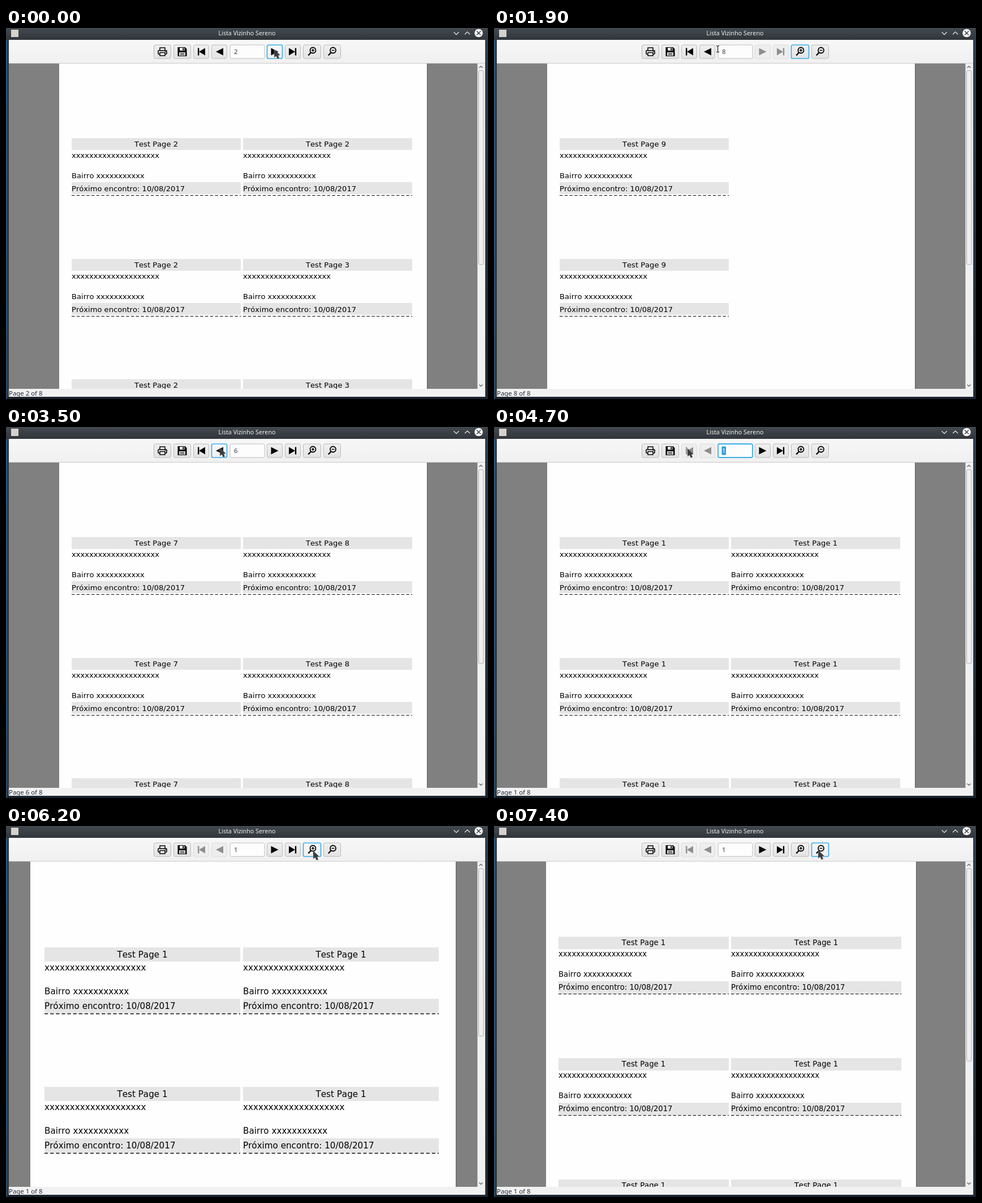
These frames come from a looping animation (852 by 657 pixels, 8000 ms). An HTML page with a canvas:

```html
<!DOCTYPE html>
<html lang="pt">
<head>
<meta charset="utf-8">
<title>Lista Vizinho Sereno</title>
<style>
  html, body { margin: 0; width: 100%; height: 100%; overflow: hidden; background: #1d2b3a; }
  canvas { display: block; }
</style>
</head>
<body>
<canvas id="stage" width="852" height="657"></canvas>
<script>
const ctx = document.getElementById('stage').getContext('2d');
const LOOP = 8000, LAST_LABEL = 57, CENTER = 419, VIEW_TOP = 63;
const BLUE = '#3daee9', UI_FONT = '"Noto Sans", sans-serif';

// Each track holds [start time, value] pairs; values change abruptly.
const pageTrack = [[0, 2], [200, 3], [1000, 8], [2600, 7], [3500, 6], [4700, 1]];
const focusTrack = [[0, 'next'], [900, 'last'], [1000, 'zoomIn'], [2400, 'prev'],
  [4500, 'first'], [4700, 'entry'], [6100, 'zoomIn'], [7400, 'zoomOut']];
const scaleTrack = [[0, 650 / 595], [6200, 752 / 595], [7400, 1.1]];
const pressTrack = [[0, ''], [100, 'next'], [200, ''], [900, 'last'], [1000, ''],
  [2400, 'prev'], [2600, ''], [3400, 'prev'], [3500, '']];
const valueAt = (track, t) => track.filter(([start]) => start <= t).pop()[1];

const moves = [
  { start: 500, end: 700, to: [508, 42] },
  { start: 1500, end: 2100, to: [378, 37] },
  { start: 4100, end: 4400, to: [342, 38] },
  { start: 5500, end: 5900, to: [543, 44], dip: 8 },
  { start: 6800, end: 7100, to: [573, 43] },
];

function cursorAt(t) {
  const tick = Math.floor(t / 100) * 100;
  let [x, y] = [474, 38];
  for (const { start, end, to, dip = 0 } of moves) {
    if (tick < start) break;
    const k = Math.min(1, (tick - start + 100) / (end - start + 100));
    const ease = 1 - (1 - k) ** 1.6;
    x += (to[0] - x) * ease;
    y += (to[1] - y) * ease + dip * Math.sin(Math.PI * k);
  }
  return [x, y];
}

function rect(x, y, w, h, fill) {
  ctx.fillStyle = fill;
  ctx.fillRect(x, y, w, h);
}

function box(x, y, w, h, fill, stroke, width = 1, radius = 2.5) {
  ctx.beginPath();
  ctx.roundRect(x, y, w, h, radius);
  ctx.fillStyle = fill;
  ctx.fill();
  ctx.strokeStyle = stroke;
  ctx.lineWidth = width;
  ctx.stroke();
}

function poly(points, fill) {
  ctx.beginPath();
  points.forEach(([x, y]) => ctx.lineTo(x, y));
  ctx.closePath();
  ctx.fillStyle = fill;
  ctx.fill();
}

function line(points, stroke, width = 1) {
  ctx.beginPath();
  points.forEach(([x, y]) => ctx.lineTo(x, y));
  ctx.strokeStyle = stroke;
  ctx.lineWidth = width;
  ctx.stroke();
}

function text(str, x, y, font, fill, align = 'left') {
  ctx.font = font;
  ctx.fontKerning = 'none';
  ctx.textAlign = align;
  ctx.fillStyle = fill;
  ctx.fillText(str, x, y);
}

function gradient(y0, y1, from, to) {
  const g = ctx.createLinearGradient(0, y0, 0, y1);
  g.addColorStop(0, from);
  g.addColorStop(1, to);
  return g;
}

function chevron(x, y, size, dir, color) {
  line([[x - size, y - dir * size / 2], [x, y + dir * size / 2], [x + size, y - dir * size / 2]], color, 1.1);
}

// Icons are drawn around the origin, the centre of the button.
const triangle = (x, length, color) => poly([[x, -6.5], [x + length, 0], [x, 6.5]], color);

function magnifier(plus) {
  ctx.beginPath();
  ctx.arc(1.5, -2.5, 5, 0, 7);
  ctx.strokeStyle = '#000';
  ctx.lineWidth = 1.8;
  ctx.stroke();
  line([[-2, 1.5], [-6.7, 6.5]], '#000', 2.3);
  line([[-1, -2.5], [4, -2.5]], '#000', 1.5);
  if (plus) line([[1.5, -5], [1.5, 0]], '#000', 1.5);
}

const icons = {
  print() {
    box(-7.5, -2.5, 15, 7, '#eee', '#000', 1.6, 2);
    box(-4.5, -7, 9, 5, '#eee', '#000', 1.5, 0);
    box(-4.5, 1.5, 9, 5.5, '#eee', '#000', 1.5, 0);
    rect(4.5, -1, 1.5, 1.5, '#000');
  },
  save() {
    poly([[-8, -8], [5, -8], [8, -5], [8, 8], [-8, 8]], '#000');
    rect(-4.5, -7, 8.5, 5, '#eee');
    rect(0.8, -6.5, 2, 4, '#000');
    rect(-5.5, 1, 11, 6, '#eee');
    rect(-4, 2.5, 8, 1, '#000');
    rect(-4, 4.7, 8, 1, '#000');
  },
  first(color) { rect(-6, -6.5, 2.4, 13, color); triangle(7, -11, color); },
  prev(color) { triangle(7, -13, color); },
  next(color) { triangle(-6.5, 13, color); },
  last(color) { triangle(-7, 11, color); rect(3.8, -6.5, 2.4, 13, color); },
  zoomIn() { magnifier(true); },
  zoomOut() { magnifier(false); },
};

const buttons = [
  ['print', 261, 31], ['save', 296, 31], ['first', 331, 28], ['prev', 363, 28],
  ['next', 461, 28], ['last', 493, 28], ['zoomIn', 525, 32], ['zoomOut', 561, 31],
];

function drawButton([name, x, w], { page, focus, pressed, cursor: [cx, cy] }) {
  const disabled = page === 1 ? ['first', 'prev'] : page === 8 ? ['next', 'last'] : [];
  const off = disabled.includes(name);
  const hover = !off && cx >= x && cx < x + w && cy > 29 && cy < 55;
  const fill = pressed === name ? '#dcdcdc'
    : off ? '#eeeeee'
    : hover ? gradient(30, 54, '#f8f8f8', '#efefef')
    : gradient(30, 54, '#f0f0f0', '#e3e3e3');
  const focused = focus === name;
  box(x + 0.5, 30, w - 1, 24, fill, focused ? BLUE : off ? '#dcdcdc' : '#b9babb', focused ? 1.7 : 1);
  ctx.save();
  ctx.translate(x + w / 2, 42);
  icons[name](off ? '#8e8e8e' : '#000');
  ctx.restore();
}

function drawEntry(page, focused) {
  box(396, 30, 61, 24, '#fdfdfd', focused ? BLUE : '#bcbdbe', focused ? 1.8 : 1);
  if (focused) rect(402.5, 34.5, 7.5, 15, '#2f9fd8');
  text(page, 403, 46.3, '11.4px ' + UI_FONT, focused ? '#fff' : '#333a40');
}

function drawLabel(number, scale) {
  const px = points => Math.floor(points * scale);
  const font = `${12 * scale}px "DejaVu Sans", sans-serif`;
  const width = px(274);
  rect(0, px(121), width, px(20), '#e5e5e5');
  rect(0, px(193), width, px(20), '#e5e5e5');
  text('Test Page ' + number, width / 2, px(135), font, '#000', 'center');
  text('x'.repeat(20), 0, px(153), font, '#000');
  text('Bairro ' + 'x'.repeat(11), 0, px(186), font, '#000');
  text('Próximo encontro: 10/08/2017', 0, px(207), font, '#000');
  ctx.setLineDash([5 * scale, 3 * scale]);
  const cut = px(213.4) + 0.5;
  line([[0, cut], [width, cut]], '#000', scale);
  ctx.setLineDash([]);
}

function drawPage(page, scale) {
  rect(5, VIEW_TOP, 828, 576, '#808080');
  ctx.save();
  ctx.beginPath();
  ctx.rect(5, VIEW_TOP, 828, 576);
  ctx.clip();
  const left = Math.round(CENTER - 595 * scale / 2);
  const right = Math.round(CENTER + 595 * scale / 2);
  rect(left, VIEW_TOP, right - left, 600, '#fefefe');
  rect(right, VIEW_TOP, 1, 600, '#5c5c5c');
  // Eight labels a page, filled column by column; about six share a number.
  for (let slot = 0; slot < 8; slot++) {
    const index = 8 * (page - 1) + slot;
    if (index > LAST_LABEL) break;
    const number = Math.min(9, Math.max(1, 3 + Math.floor((index - 13) * 6 / 37)));
    const column = Math.floor(slot / 4), row = slot % 4;
    ctx.save();
    ctx.translate(left + Math.round((20 + 277.2 * column) * scale),
      VIEW_TOP + Math.ceil(195.3 * row * scale));
    drawLabel(number, scale);
    ctx.restore();
  }
  ctx.restore();
}

function drawScrollbar(scale) {
  rect(833, VIEW_TOP, 14, 576, '#eff0f0');
  rect(833, VIEW_TOP, 1, 576, '#c4c5c6');
  box(835.5, 75.5, 8.5, 376 / scale - 1, '#eeeeee', '#adaeaf', 1, 2);
  chevron(839.5, 69, 3, -1, '#555');
  chevron(839.5, 633, 3, 1, '#555');
}

function drawWindow(page) {
  rect(0, 0, 852, 657, gradient(0, 657, '#27435a', '#17222e'));
  rect(0, 0, 2, 657, gradient(0, 657, '#2c5f87', '#2a4a66'));
  rect(2, 0, 847, 654, '#31363b');
  rect(0, 0, 850, 21, gradient(0, 21, '#434a50', '#30353a'));
  rect(5, 21, 842, 42, gradient(21, 63, '#f7f7f7', '#f0f0f0'));
  rect(5, 62, 842, 1, '#c9cacb');
  rect(5, 639, 842, 14, '#f1f1f1');
  rect(9, 3, 13, 13, '#d5d2cb');
  text('Lista Vizinho Sereno', 426, 13, '10.7px ' + UI_FONT, '#eff0f1', 'center');
  chevron(796, 9.5, 4.5, 1, '#eff0f1');
  chevron(815.5, 9, 4.5, -1, '#eff0f1');
  ctx.beginPath();
  ctx.arc(835.5, 9, 7.3, 0, 7);
  ctx.fillStyle = '#f4f4f4';
  ctx.fill();
  line([[832, 5.5], [839, 12.5]], '#31363b', 1.2);
  line([[839, 5.5], [832, 12.5]], '#31363b', 1.2);
  text(`Page ${page} of 8`, 5, 650.5, '11.4px ' + UI_FONT, '#232a40');
}

function drawCursor([x, y]) {
  ctx.save();
  ctx.translate(x, y);
  if (x > 393 && x < 458 && y < 55) {
    line([[-2.5, -6.5], [0, -5.5], [2.5, -6.5]], '#333', 1.2);
    line([[0, -6], [0, 5]], '#333', 1.3);
    line([[-2.5, 5.5], [0, 4.5], [2.5, 5.5]], '#333', 1.2);
  } else {
    const arrow = [[0, 0], [0.3, 14], [3.5, 11.5], [6, 16.5], [8.8, 15.3], [6.8, 10.5], [10.5, 10]];
    line([...arrow, arrow[0]], '#b4b4b4', 0.8);
    poly(arrow, '#3a3d40');
  }
  ctx.restore();
}

function render(now) {
  const t = now % LOOP;
  const page = valueAt(pageTrack, t);
  const focus = valueAt(focusTrack, t);
  const scale = valueAt(scaleTrack, t);
  const cursor = cursorAt(t);
  const state = { page, focus, pressed: valueAt(pressTrack, t), cursor };
  drawWindow(page);
  drawPage(page, scale);
  drawScrollbar(scale);
  buttons.forEach(button => drawButton(button, state));
  drawEntry(page, focus === 'entry');
  drawCursor(cursor);
}

const began = performance.now();
function loop() {
  render(performance.now() - began);
  requestAnimationFrame(loop);
}
loop();
</script>
</body>
</html>
```
